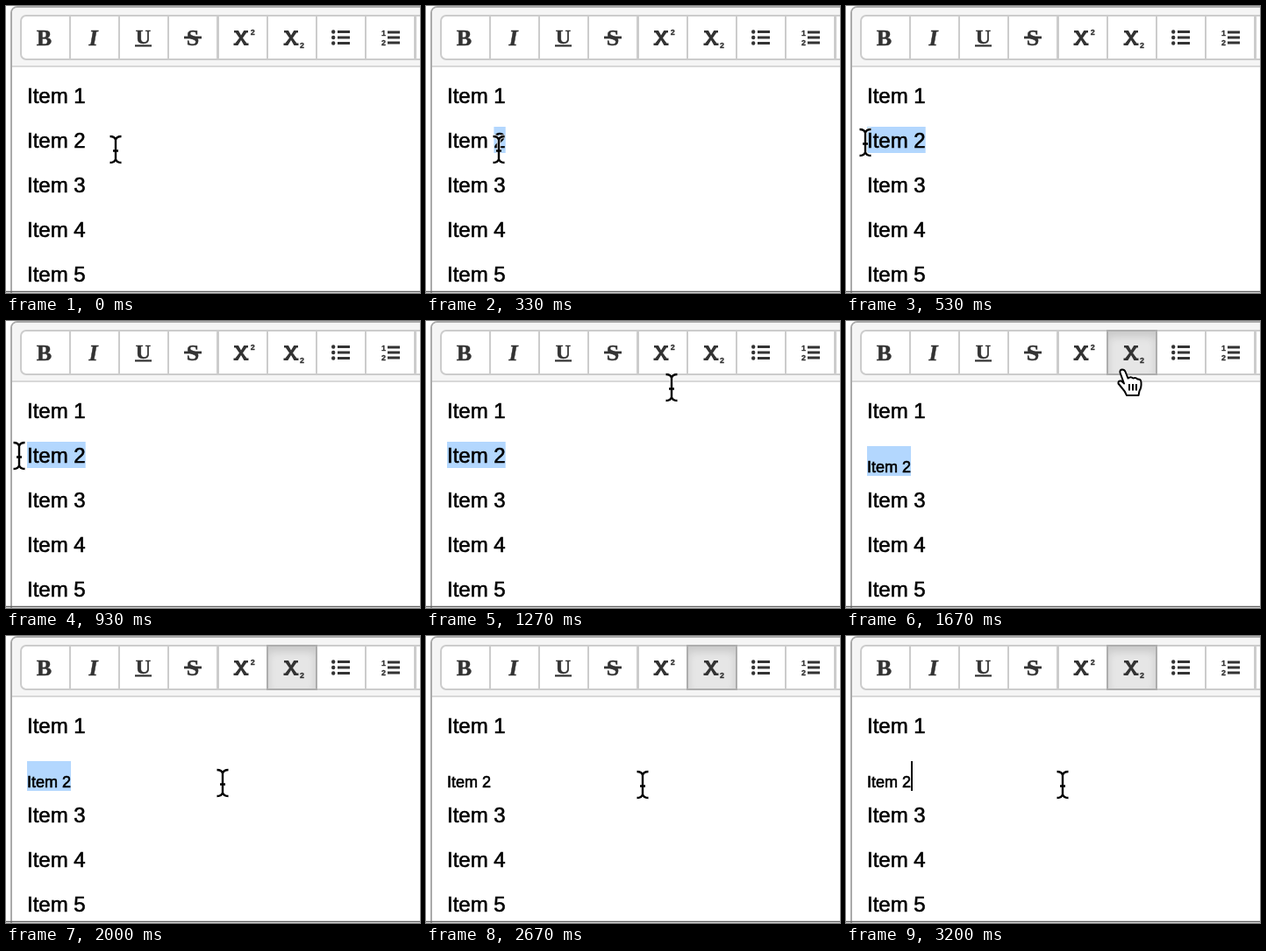
Animation of 472x328 px, one loop 3390 ms. Source, as an HTML page:

```html
<!DOCTYPE html>
<html lang="en">
<head>
<meta charset="utf-8">
<title>Subscript in a text editor</title>
<style>
  html, body { margin: 0; width: 100%; height: 100%; overflow: hidden; background: #fff; }
  #stage { position: relative; width: 472px; height: 328px; overflow: hidden; }
  svg { position: absolute; left: 0; top: 0; }
  .button {
    position: absolute; top: 10px; width: 58px; height: 52px; box-sizing: border-box;
    background: #fff; border: 2px solid #ccc;
  }
  .button:first-of-type { border-radius: 7px 0 0 7px; }
  .button.hover, .button.active { background: #e6e6e6; border-color: #adadad; z-index: 1; }
  .button.active { box-shadow: inset 0 6px 10px rgba(0, 0, 0, .125); }
  #front { z-index: 2; }
  .icons { fill: #333; font: bold 26px "Liberation Serif", serif; text-anchor: middle; }
  .icons text { stroke: #333; stroke-width: .5px; }
  .icons .digit { font: bold 9px "Liberation Sans", sans-serif; stroke-width: .3px; }
  .line { font: 24px "Liberation Sans", sans-serif; stroke: #000; stroke-width: .6px; }
</style>
</head>
<body>
<div id="stage">
  <svg width="472" height="328">
    <rect x="6" y="1" width="500" height="400" rx="7" fill="#fff" stroke="#aaa" stroke-width="2"/>
    <path d="M7 69V8Q7 2 13 2H472V69Z" fill="#f5f5f5"/>
    <path d="M7 69H472" stroke="#d8d8d8" stroke-width="2"/>
  </svg>
  <svg id="front" width="472" height="328">
    <defs>
      <path id="cross" d="M-8-8.500H-3L0-3L3.200-8.500H8V-6H6.200L2 0L6.400 6H8.500V8.500H3.400L0 2.600L-3.600 8.500H-8.500V6H-6.600L-2 0L-6.200-6H-8Z"/>
      <path id="beam" d="M-6.500-15Q-1-15 0-11Q1-15 6.500-15M0-11V11M-6.500 15Q-1 15 0 11Q1 15 6.500 15M-3 1.500H3"/>
    </defs>
    <g class="icons">
      <text x="43.5" y="45">B</text>
      <text x="99.5" y="45" font-style="italic">I</text>
      <text x="156.5" y="43" font-size="24">U</text>
      <rect x="147" y="44.3" width="19" height="2.2"/>
      <text x="213" y="45">S</text>
      <rect x="203" y="34.6" width="20" height="2.8"/>
      <use href="#cross" x="268" y="36.5"/>
      <text class="digit" x="281.3" y="33">2</text>
      <use href="#cross" x="325" y="36.5"/>
      <text class="digit" x="337.5" y="47.5">2</text>
      <path d="M378 29.500H392M378 36H392M378 42.500H392" stroke="#333" stroke-width="3"/>
      <path d="M373.200 29.500h0M373.200 36h0M373.200 42.500h0" stroke="#333" stroke-width="4.4" stroke-linecap="round"/>
      <path d="M435 30H449M435 36H449M435 42H449" stroke="#333" stroke-width="3"/>
      <text class="digit" x="430.5" y="34">1</text>
      <text class="digit" x="430.5" y="44.5">2</text>
    </g>
    <rect id="selection" fill="#b3d7fe"/>
    <g id="lines"></g>
    <rect id="caret" x="74" y="143" width="2" height="34"/>
    <path d="M0 326.500H472" stroke="#606060" stroke-width="1.4"/>
    <g id="cursor" fill="none">
      <g id="ibeam">
        <use href="#beam" stroke="#fff" stroke-width="4.5" stroke-opacity=".8"/>
        <use href="#beam" stroke="#000" stroke-width="2.4"/>
      </g>
      <g id="hand" stroke="#000" stroke-width="2" stroke-linejoin="round">
        <path fill="#fff" d="M-5.500 2Q-6-1.500-3-1.500Q-.5-1.500 .5 1L3.500 8.500Q6.500 6 9.500 8.500Q12 7 14.500 9.500Q18 9 18.500 13Q19 19 16.500 23L15.500 28H2Q0 23-3 20L-7.500 14.500Q-8 11-4.500 11.500Q-2.500 12.500-1 14.500Z"/>
        <path d="M5 15V22.500M9 15V22.500M13 15V22.500"/>
      </g>
    </g>
  </svg>
</div>
<script>
const LOOP = 3390;
const $ = id => document.getElementById(id);
const show = (node, on) => node.style.display = on ? '' : 'none';
const place = (node, attrs) => Object.entries(attrs).forEach(([key, value]) => node.setAttribute(key, value));

// Toolbar buttons
const buttons = Array.from({ length: 9 }, (_, i) => {
  const button = document.createElement('div');
  button.className = 'button';
  button.style.left = Math.floor(16 + 56.25 * i) + 'px';
  $('stage').append(button);
  return button;
});
const subscript = buttons[5];

// Paragraphs
const lines = Array.from({ length: 5 }, (_, i) => {
  const line = document.createElementNS('http://www.w3.org/2000/svg', 'text');
  line.textContent = `Item ${i + 1}`;
  line.setAttribute('class', 'line');
  place(line, { x: 24, y: 111 + 51 * i });
  $('lines').append(line);
  return line;
});

// Pointer hotspot: time, x, y
const path = [
  [0, 125, 164], [70, 123, 164], [200, 108, 164], [330, 83, 164], [470, 40, 159],
  [530, 22, 156], [600, 16, 154], [730, 13, 153], [870, 13, 153], [930, 15, 154],
  [1000, 34, 149], [1130, 150, 115], [1270, 280, 76], [1330, 311, 61], [1400, 318, 57],
  [1800, 318, 57], [1870, 309, 53], [1930, 300, 48], [2000, 247, 168], [2070, 247, 170], [LOOP, 247, 170]
];

function pointerAt(t) {
  const i = path.findIndex(key => key[0] > t);
  const [t0, x0, y0] = path[i - 1], [t1, x1, y1] = path[i];
  const k = (t - t0) / (t1 - t0);
  return [x0 + (x1 - x0) * k, y0 + (y1 - y0) * k];
}

// Character edges of "Item 2"
const edges = [24, 30.7, 37.4, 50.7, 70.7, 77.4, 90.7];
const nearestEdge = x => edges.reduce((a, b) => Math.abs(b - x) < Math.abs(a - x) ? b : a);

function draw(t) {
  const [x, y] = pointerAt(t);
  const overToolbar = y < 69;
  const lowered = t >= 1670;
  const pressed = t >= 1600;

  place($('cursor'), { transform: `translate(${x} ${y})` });
  show($('ibeam'), !overToolbar);
  show($('hand'), overToolbar);

  subscript.className = 'button' + (pressed ? ' active' : overToolbar ? ' hover' : '');

  lines[1].style.fontSize = lowered ? '18px' : '24px';
  place(lines[1], { y: lowered ? 173 : 162 });

  const start = t <= 530 ? nearestEdge(x) : 24;
  place($('selection'), lowered
    ? { x: 24, y: 143, width: 50, height: 34 }
    : { x: start, y: 138, width: 90.7 - start, height: 30 });
  show($('selection'), t < 2200);
  show($('caret'), t >= 2200 && t < 2670 || t >= 3200);
}

function tick(now) {
  const step = Math.floor((now % LOOP + 3.4) * 0.015);
  draw(Math.min(Math.round(step * 20 / 3) * 10, LOOP - 10));
  requestAnimationFrame(tick);
}
draw(0);
requestAnimationFrame(tick);
</script>
</body>
</html>
```
